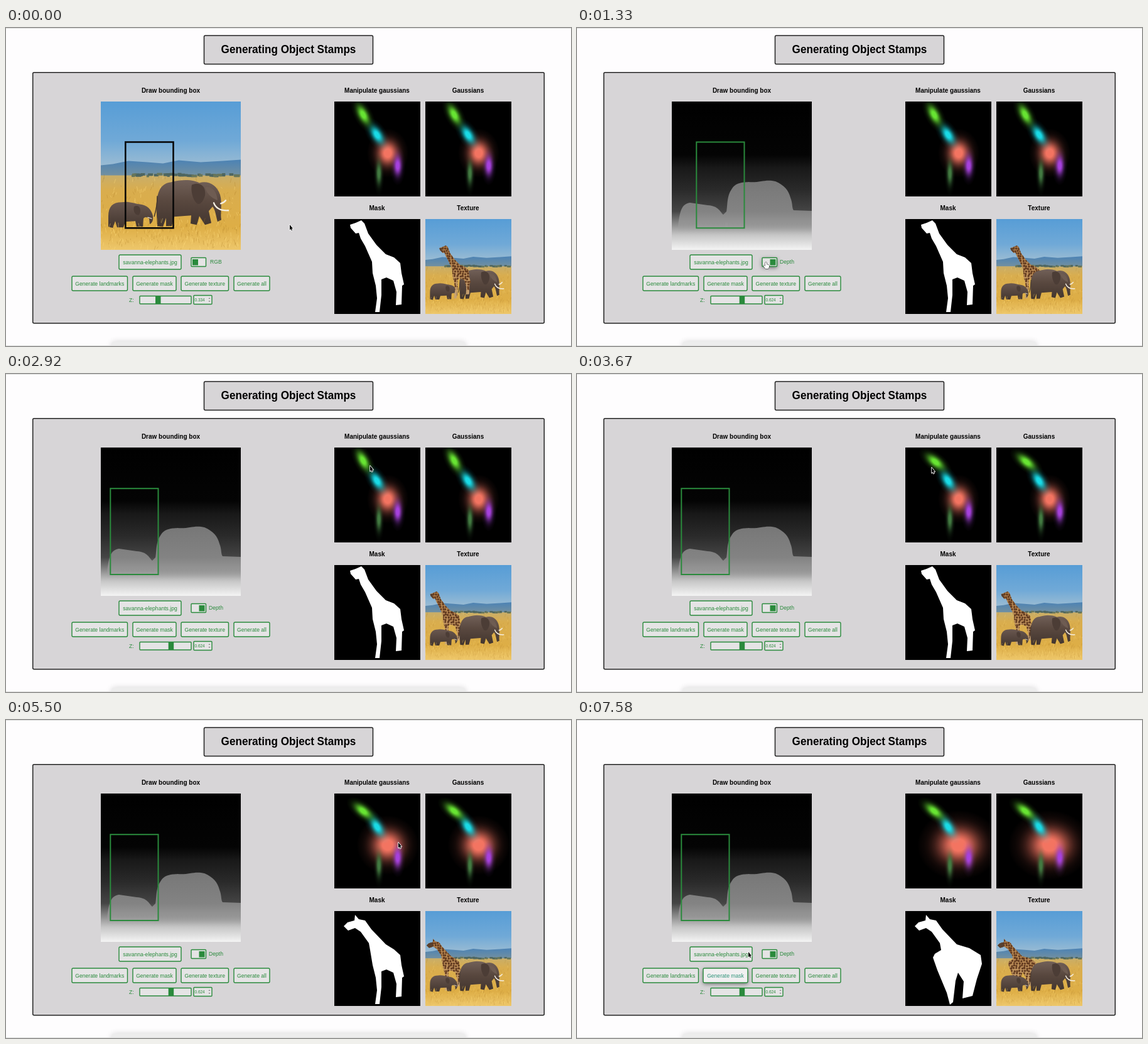
Write an HTML page with a canvas that moves like this. It is 900 px wide and 506 px high and loops after 7.66 s.

```html
<!DOCTYPE html>
<html lang="en">
<head>
<meta charset="utf-8">
<title>Generating Object Stamps</title>
<style>
html, body { margin: 0; width: 100%; height: 100%; overflow: hidden; background: #fefdfe; }
canvas { display: block; width: 100vw; height: 100vh; }
</style>
</head>
<body>
<canvas id="stage" width="900" height="506"></canvas>
<script>
const g = document.getElementById('stage').getContext('2d');
const LOOP = 7660, STEP = 1000 / 12;
const GREEN = '#2a8a3c', PANEL = '#d7d5d7';
const SQUEEZE = 0.9; // the whole interface is shown slightly narrowed

const random = n => { const v = Math.sin(n * 127.1) * 43758.5453; return v - Math.floor(v); };
const between = (t, a, b) => t >= a && t < b;

// Eased interpolation through [time, ...values] keys.
function track(t, keys) {
  const i = keys.findIndex(k => k[0] > t);
  if (i < 0) return keys[keys.length - 1].slice(1);
  if (i === 0) return keys[0].slice(1);
  const [a, b] = [keys[i - 1], keys[i]];
  const u = (t - a[0]) / (b[0] - a[0]), e = u * u * (3 - 2 * u);
  return a.slice(1).map((v, j) => v + (b[j + 1] - v) * e);
}

const CURSOR = [
  [0, 452, 317], [330, 242, 433], [420, 242, 433], [660, 263, 433], [830, 316, 407], [1000, 316, 407],
  [1240, 301, 377], [1340, 301, 377], [1500, 215, 250], [1580, 215, 250], [1840, 191, 251],
  [2160, 313, 405], [2510, 313, 405], [2920, 580, 150], [3050, 580, 150], [3500, 565, 153],
  [3670, 565, 153], [3780, 571, 140], [4080, 569, 145], [4300, 560, 250], [4800, 560, 250],
  [5080, 608, 199], [5250, 608, 199], [5750, 642, 199], [6170, 245, 417], [6800, 245, 417],
  [7500, 273, 373]
];
const DEPTH_KEYS = [[420, 0.334], [660, 0.624]];
const BOX_KEYS = [[1580, 190], [1840, 166]];
const NECK_KEYS = [[3050, 569, 138, 62], [3500, 571, 140, 38], [3780, 571, 140, 38], [4080, 569, 145, 38]];
const BODY_KEYS = [[5250, 11, 13], [5750, 22, 18.5]];

// ---- shapes ----
const polygon = (...parts) => new Path2D('M' + parts.join(' ') + 'Z');
const headUp = '583 372 572 347 565 335 562 326 557 327 549 318 548 313 557 310 566 306 571 311 577 327 590 345 605 360';
const headLow = '580 366 578 355 565 337 556 331 545 335 538 328 544 322 555 319 556 310 562 317 572 319 582 333 605 357';
const bodySlim = '618 365 628 374 630 390 634 408 631 410 630 440 621 441 622 420 617 402 606 397 598 400 598 425 595 452 588 452 591 430 589 410 584 390';
const bodyWide = '625 363 643 374 645 388 637 412 630 439 614 443 616 416 607 402 603 415 599 449 594 453 589 434 574 398 567 378 570 372';
const MASKS = [polygon(headUp, bodySlim), polygon(headLow, bodySlim), polygon(headLow, bodyWide)];

const adult = new Path2D('M240 298C238 262 246 248 262 246C285 240 300 243 308 247C322 243 336 250 341 266C345 280 341 296 343 306L337 309C334 299 334 291 329 285L323 292L327 311L317 314L308 300L304 314L294 312L295 299L268 301L264 316L255 316L255 303L250 317L241 316Z');
const calf = new Path2D('M163 300C163 285 170 278 184 278C195 276 205 280 212 281C225 282 232 290 234 300C235 306 233 311 229 313L228 304C224 301 221 301 219 304L218 317L208 317L206 308L190 309L187 318L177 318L174 308L170 319L163 317Z');
const hills = new Path2D('M151 219L170 217L195 212L225 214L250 216L275 211L310 214L345 212L374 210V236H151Z');
const adultDepth = new Path2D('M236 302C241 287 237 270 246 257C253 245 264 246 273 245C290 247 300 240 316 244C330 250 337 258 340 270C344 280 342 286 345 290L374 291V325H236Z');
const calfDepth = new Path2D('M161 315C164 292 166 280 180 278L208 282C226 283 228 293 233 297L240 290V325H161Z');

function fill(path, color) { g.fillStyle = color; g.fill(path); }

function vertical(y0, y1, ...stops) {
  const gradient = g.createLinearGradient(0, y0, 0, y1);
  stops.forEach(([p, c]) => gradient.addColorStop(p, c));
  return gradient;
}

function clipped(x, y, w, h, draw) {
  g.save();
  g.beginPath(); g.rect(x, y, w, h); g.clip();
  draw();
  g.restore();
}

function landscape() {
  g.fillStyle = vertical(117, 222, [0, '#579dd6'], [0.6, '#70a9d7'], [1, '#9dbdd3']);
  g.fillRect(151, 117, 223, 120);
  fill(hills, vertical(211, 236, [0, '#4d83b4'], [1, '#7390a0']));
  g.fillStyle = vertical(235, 353, [0, '#c9ae69'], [0.2, '#d9ad4e'], [0.7, '#deae46'], [1, '#edc66a']);
  g.fillRect(151, 235, 223, 119);
  for (let i = 0; i < 45; i++) {
    const x = 200 + random(i) * 174;
    g.fillStyle = i % 3 ? '#4e6660' : '#68765a';
    g.fillRect(x, 231 + random(i + 60) * 3, 4 + random(i + 9) * 6, 4);
  }
  grass(260, 238, 112, 0);
}

function grass(count, top, height, seed) {
  g.lineWidth = 0.8;
  for (let i = seed; i < seed + count; i++) {
    const x = 151 + random(i + 300) * 223, y = top + random(i + 900) * height;
    g.strokeStyle = i % 2 ? 'rgba(255,220,125,.55)' : 'rgba(170,122,35,.4)';
    g.beginPath(); g.moveTo(x, y);
    g.lineTo(x + random(i) * 5 - 2.5, y - 2 - random(i + 50) * 6);
    g.stroke();
  }
}

function elephants() {
  fill(adult, vertical(243, 316, [0, '#716058'], [0.45, '#59483f'], [1, '#42352e']));
  fill(new Path2D('M296 250C311 244 319 254 317 267C314 278 308 284 303 279C297 272 294 259 296 250Z'), '#4c3d36');
  fill(new Path2D('M317 254C327 251 336 260 337 275C331 272 321 268 317 254Z'), '#6e5c52');
  g.strokeStyle = '#44372f'; g.lineWidth = 1.5;
  g.stroke(new Path2D('M241 268Q241 285 236 301'));
  g.strokeStyle = '#f5efe2'; g.lineWidth = 2.4; g.lineCap = 'round';
  g.stroke(new Path2D('M331 279Q336 292 354 291M342 280Q347 279 350 275'));
  fill(calf, vertical(277, 318, [0, '#6a5850'], [1, '#43362f']));
  fill(new Path2D('M204 285C212 280 217 290 212 298C206 300 202 292 204 285Z'), '#4c3d36');
  g.lineWidth = 1.2;
  g.stroke(new Path2D('M226 302L232 304'));
  g.lineCap = 'butt';
  grass(170, 310, 46, 1000);
}

function giraffe(shape, boxX) {
  g.save();
  g.translate(boxX + 38.5, 249.5);
  g.scale(0.94, 0.907);
  g.translate(-591.5, -379.5);
  g.clip(MASKS[shape]);
  g.fillStyle = vertical(306, 452, [0, '#a87845'], [0.5, '#b98a55'], [1, '#c7a374']);
  g.fillRect(523, 304, 137, 151);
  g.fillStyle = '#633b20';
  for (let y = 306, n = 0; y < 430; y += 7) {
    for (let x = 540; x < 650; x += 7, n++) {
      g.beginPath();
      g.ellipse(x + random(n) * 4, y + random(n + 40) * 3, 2.5 + random(n + 80), 2.8, n, 0, 7);
      g.fill();
    }
  }
  g.fillStyle = '#59402e';
  g.fillRect(536, 313, 19, 24);
  g.restore();
}

function photo(x, y, w, h, drawStamp, inFront) {
  clipped(x, y, w, h, () => {
    g.translate(x, y); g.scale(w / 223, h / 237); g.translate(-151, -117);
    landscape();
    if (drawStamp && !inFront) drawStamp();
    elephants();
    if (drawStamp && inFront) drawStamp();
  });
}

function depthMap() {
  clipped(151, 117, 223, 236, () => {
    g.fillStyle = vertical(117, 353, [0, '#000'], [0.36, '#040404'], [0.45, '#191919'], [0.6, '#2b2b2b'],
      [0.74, '#454545'], [0.82, '#858585'], [0.9, '#c6c6c6'], [1, '#f4f4f4']);
    g.fillRect(151, 117, 223, 237);
    const gray = vertical(243, 325, [0, '#777'], [0.6, '#838383'], [0.8, '#939393'], [1, 'rgba(170,170,170,0)']);
    fill(adultDepth, gray);
    fill(calfDepth, gray);
  });
}

// ---- gaussians ----
function gaussian(x, y, sx, sy, degrees, rgb) {
  g.save();
  g.translate(x, y); g.rotate(degrees * Math.PI / 180); g.scale(sx, sy);
  const glow = g.createRadialGradient(0, 0, 0, 0, 0, 3);
  for (let i = 0; i <= 12; i++) {
    const r = i / 4, a = i === 12 ? 0 : Math.min(1, 1.15 * Math.exp(-r * r / 2));
    glow.addColorStop(i / 12, `rgba(${rgb},${a})`);
  }
  g.fillStyle = glow;
  g.fillRect(-3, -3, 6, 6);
  g.restore();
}

function gaussians(offset, t) {
  const [nx, ny, angle] = track(t, NECK_KEYS), [sx, sy] = track(t, BODY_KEYS);
  clipped(523 + offset, 117, 137, 151, () => {
    g.fillStyle = '#000'; g.fillRect(523 + offset, 117, 137, 151);
    g.translate(offset, 0);
    gaussian(608, 199, sx, sy, 0, '243,116,97');
    gaussian(594, 231, 3, 12, 0, '66,122,65');
    gaussian(624, 219, 4.2, 10.5, 0, '166,65,222');
    gaussian(591, 170, 10.2, 5.3, 58, '25,218,230');
    gaussian(nx, ny, 10.5, 5, angle, '103,228,50');
  });
}

function loading(x) {
  g.fillStyle = 'rgba(0,0,0,.8)'; g.fillRect(x, 304, 137, 151);
  g.strokeStyle = '#eee'; g.lineWidth = 2;
  g.beginPath(); g.ellipse(x + 68.2, 379.3, 14, 15.8, 0, 0, 7); g.stroke();
}

// ---- interface ----
function label(text, x, y, size, { color = '#000', weight = 'normal', align = 'center' } = {}) {
  g.save();
  g.translate(x, y); g.scale(SQUEEZE, 1);
  g.font = `${weight} ${size}px "Liberation Sans", Arial, sans-serif`;
  g.textAlign = align; g.fillStyle = color;
  g.fillText(text, 0, 0);
  g.restore();
}

function frame(x, y, w, h, background, border, hover = false, radius = 2, line = 1.4) {
  g.save();
  if (hover) { g.shadowColor = 'rgba(0,0,0,.5)'; g.shadowBlur = 6; g.shadowOffsetY = 2; }
  g.beginPath(); g.roundRect(x, y, w, h, radius);
  g.fillStyle = background; g.fill();
  g.shadowColor = 'transparent';
  g.strokeStyle = border; g.lineWidth = line; g.stroke();
  g.restore();
}

function button(text, x, y, w, hover) {
  const grow = hover ? 1 : 0;
  frame(x - grow, y, w + 2 * grow, 23, hover ? '#f1f0f1' : '#e5e4e5', GREEN, hover);
  label(text, x + w / 2, y + 15, 9.55, { color: hover ? '#30947a' : GREEN });
}

function controls(t, isDepth) {
  const [z] = track(t, DEPTH_KEYS), handle = 238 + (z - 0.334) / 0.29 * 20.7;
  button('savanna-elephants.jpg', 180, 361, 99, false);
  button('Generate landmarks', 105, 395, 88.5, false);
  button('Generate mask', 202, 395, 69, t >= 6080);
  button('Generate texture', 279, 395, 75.5, between(t, 780, 1080) || between(t, 2080, 2590));
  button('Generate all', 363, 395, 57, false);

  frame(295, 365.5, 23.5, 14, '#e5e4e5', GREEN, between(t, 1160, 1410), 1);
  g.fillStyle = GREEN; g.fillRect(isDepth ? 307.5 : 297, 368, 9, 9.5);
  label(isDepth ? 'Depth' : 'RGB', isDepth ? 323 : 325, 375, 9.55, { color: GREEN, align: 'left' });

  label('Z:', 196, 436, 9.55, { color: GREEN, align: 'left' });
  frame(213, 426.5, 82, 12.5, '#e5e4e5', GREEN, false, 1);
  g.fillStyle = GREEN; g.fillRect(handle, 427, 8.5, 12);
  frame(299, 425.5, 29, 14, '#e5e4e5', GREEN, false, 1);
  label(z.toFixed(3), 300.5, 435, 7.2, { color: GREEN, align: 'left' });
  fill(new Path2D('M322.5 431L324 429L325.5 431ZM322.5 434L324 436L325.5 434Z'), '#888');
}

const ARROW = new Path2D('M0 0V9L2 7.2L3.4 10L4.7 9.4L3.5 6.7H6Z');
const HAND = new Path2D('M-1 -4Q0 -5 1 -4V-1L4.5 0Q5.5 1 5 3L4 6H-1L-4 1.5Q-4 0 -2.5 .5L-1 2Z');

function cursor(t) {
  if (between(t, 4300, 4800)) return;
  const [x, y] = track(t, CURSOR);
  const hand = between(t, 780, 1080) || between(t, 1160, 1410) || between(t, 2080, 2590) || between(t, 6080, 6900);
  g.save();
  g.translate(x, y);
  g.lineJoin = 'round';
  if (!hand) { g.translate(0, -4); g.scale(0.85, 0.95); }
  g.lineWidth = hand ? 1 : 1.8;
  g.strokeStyle = hand ? '#222' : '#fff';
  g.stroke(hand ? HAND : ARROW);
  fill(hand ? HAND : ARROW, hand ? '#fff' : '#000');
  g.restore();
}

function draw(t) {
  const isDepth = t >= 1240;
  const shape = t < 4830 ? 0 : t < 6830 ? 1 : 2;
  const maskLoading = between(t, 4240, 4830) || between(t, 6160, 6830);
  const textureLoading = maskLoading || between(t, 830, 1080) || between(t, 2160, 2580);

  g.fillStyle = '#fefdfe'; g.fillRect(0, 0, 900, 506);
  g.fillStyle = '#dedede'; g.fillRect(0, 0, 900, 1); g.fillRect(0, 505, 900, 1);
  clipped(0, 490, 900, 15, () => {
    g.shadowColor = 'rgba(0,0,0,.16)'; g.shadowBlur = 10;
    g.fillStyle = '#ededed';
    g.beginPath(); g.roundRect(168, 499, 564, 20, 5); g.fill();
  });

  frame(315.5, 12, 269, 45.5, PANEL, '#222', false, 2, 1.5);
  label('Generating Object Stamps', 450, 40, 19, { weight: 'bold' });
  frame(42.7, 70.7, 814.6, 399, PANEL, '#222', false, 2, 1.5);
  [['Draw bounding box', 262.5, 102.5], ['Manipulate gaussians', 591, 102.5], ['Gaussians', 736, 102.5],
    ['Mask', 591, 290], ['Texture', 736, 290]]
    .forEach(([text, x, y]) => label(text, x, y, 11.1, { weight: 'bold' }));

  if (isDepth) depthMap(); else photo(151, 117, 223, 236);
  const [boxX] = track(t, BOX_KEYS);
  g.strokeStyle = isDepth ? GREEN : '#080808';
  g.lineWidth = isDepth ? 2 : 2.6;
  g.strokeRect(boxX + 0.3, 181.5 + (190 - boxX) / 24 * 0.7, 76.2, 136.8);

  controls(t, isDepth);
  gaussians(0, t);
  gaussians(145, t);

  g.fillStyle = '#000'; g.fillRect(523, 304, 137, 151);
  fill(MASKS[shape], '#fff');
  if (maskLoading) loading(523);
  photo(668, 304, 137, 151, () => giraffe(shape, t < 2580 ? 190 : 166), t < 1080);
  if (textureLoading) loading(668);
  cursor(t);
}

let lastStep = -1;
function tick() {
  const step = Math.floor((performance.now() % LOOP + 4) / STEP);
  if (step !== lastStep) { lastStep = step; draw(step * STEP); }
  requestAnimationFrame(tick);
}
tick();
</script>
</body>
</html>
```
